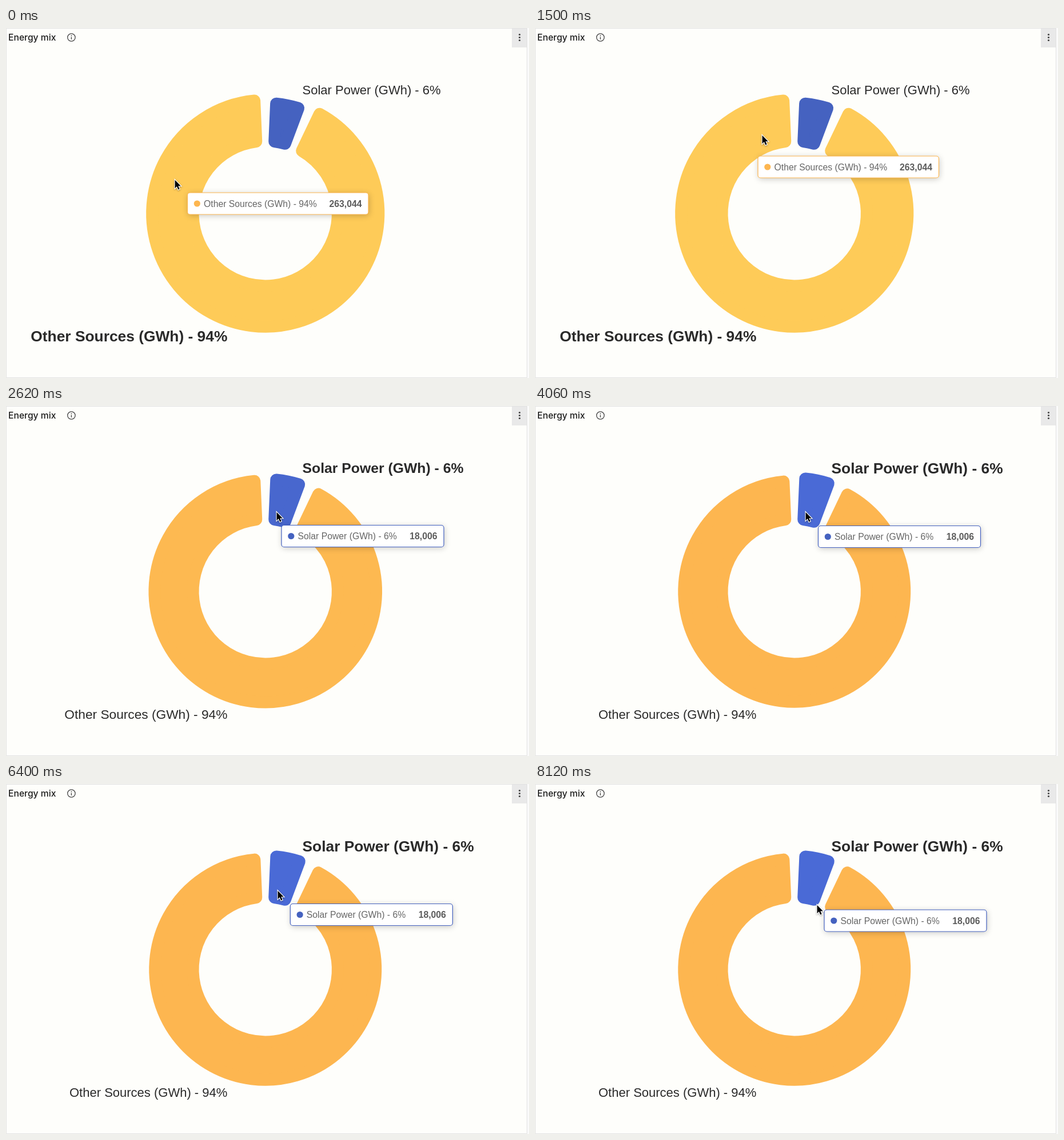
Animation of 915 by 612 pixels, one loop 8140 ms. Source, as an HTML page with a canvas:

```html
<!DOCTYPE html>
<html lang="en">
<head>
<meta charset="utf-8">
<title>Energy mix</title>
<style>
  html, body { margin: 0; width: 100%; height: 100%; overflow: hidden; background: #fefefb; }
  canvas { display: block; }
</style>
</head>
<body>
<canvas id="stage" width="915" height="612"></canvas>
<script>
const ctx = document.getElementById('stage').getContext('2d');
const LOOP = 8140, CX = 453.75, CY = 324.2, INNER = 116.2;
const SANS = '"Liberation Sans", Arial, sans-serif';

// Keys are [step, x, y]
const pointerKeys = [
  [0, 295, 265], [6, 307, 252], [15, 336, 225], [18, 350, 212], [24, 372, 197],
  [31, 397, 187], [46, 445, 184], [50, 460, 184.5], [55, 473, 185], [126, 473, 185],
  [134, 475, 186], [148, 475, 186], [162, 483, 196], [174, 493, 211]
];
const tipKeys = [
  [0, 317.5, 288], [8, 322, 281], [15, 336.5, 265], [18, 347, 256], [31, 390, 224],
  [36, 411, 216], [46, 451, 209], [55, 482, 208.5], [62, 492, 209.5], [72, 495.5, 209.5],
  [126, 495.5, 209.5], [138, 497.5, 209.5], [150, 497.5, 209.5], [164, 501, 213], [174, 506, 220]
];
const parts = [
  { name: 'Other Sources (GWh) - 94%', value: '263,044', from: 25.56, to: 357.5,
    plain: [253, 182, 80], lit: [254, 203, 88], x: 387.3, y: 537.7, align: 'right', tipWidth: 316.5 },
  { name: 'Solar Power (GWh) - 6%', value: '18,006', from: 2.5, to: 20.56,
    plain: [69, 98, 192], lit: [74, 106, 214], x: 518.5, y: 107.4, align: 'left', tipWidth: 284 }
];

const clamp = v => Math.max(0, Math.min(1, v));
const cubicOut = p => 1 - (1 - p) ** 3;
const mix = (a, b, p) => a + (b - a) * p;
const rgb = c => `rgb(${c.map(Math.round)})`;

// Smooth interpolation that never overshoots its keys
function along(keys, n, axis) {
  const slope = i => keys[i + 1] && keys[i]
    ? (keys[i + 1][axis] - keys[i][axis]) / (keys[i + 1][0] - keys[i][0]) : 0;
  const tangent = i => {
    const a = slope(i - 1), b = slope(i);
    return a * b > 0 ? 2 * a * b / (a + b) : 0;
  };
  let i = 0;
  while (i < keys.length - 2 && n > keys[i + 1][0]) i++;
  const h = keys[i + 1][0] - keys[i][0], u = clamp((n - keys[i][0]) / h);
  const ease = u * u * (3 - 2 * u);
  return mix(keys[i][axis], keys[i + 1][axis], ease)
    + h * u * (1 - u) * ((1 - u) * tangent(i) - u * tangent(i + 1));
}

function text(str, x, y, font, color, align = 'left') {
  ctx.font = font;
  ctx.fillStyle = color;
  ctx.textAlign = align;
  ctx.fillText(str, x, y);
}

function dot(x, y, r, color) {
  ctx.fillStyle = color;
  ctx.beginPath();
  ctx.arc(x, y, r, 0, 7);
  ctx.fill();
}

function shadow(color, blur, x, y) {
  ctx.shadowColor = color;
  ctx.shadowBlur = blur;
  ctx.shadowOffsetX = x;
  ctx.shadowOffsetY = y;
}

// An inset sector with a thick round-joined outline gives the rounded corners
function sector(from, to, outer, color) {
  const round = 10.5, a = (from - 90) * Math.PI / 180, b = (to - 90) * Math.PI / 180;
  const big = outer - round, small = INNER + round;
  const padBig = Math.asin(round / big), padSmall = Math.asin(round / small);
  ctx.beginPath();
  ctx.arc(CX, CY, big, a + padBig, b - padBig);
  ctx.arc(CX, CY, small, b - padSmall, a + padSmall, true);
  ctx.closePath();
  ctx.fillStyle = ctx.strokeStyle = color;
  ctx.lineWidth = 2 * round;
  ctx.lineJoin = 'round';
  ctx.fill();
  ctx.stroke();
}

function panel() {
  ctx.fillStyle = '#fefefb';
  ctx.fillRect(0, 0, 915, 612);
  ctx.fillStyle = '#fafafa';
  ctx.fillRect(912, 0, 3, 612);
  ctx.fillStyle = '#e9e9e9';
  ctx.fillRect(885, 0, 27, 34);
  ctx.strokeStyle = '#e2e2e2';
  ctx.lineWidth = 1;
  ctx.strokeRect(0.5, 0.5, 911, 611);
  text('Energy mix', 4, 22, '500 15.7px Inter, sans-serif', '#1c1c1c');
  ctx.strokeStyle = '#444';
  ctx.lineWidth = 1.3;
  ctx.beginPath();
  ctx.arc(114.4, 16.5, 6.7, 0, 7);
  ctx.moveTo(114.4, 15.6);
  ctx.lineTo(114.4, 20);
  ctx.stroke();
  dot(114.4, 13.3, 0.9, '#444');
  for (const y of [11.5, 16.5, 21.5]) dot(898.5, y, 1.6, '#444');
}

function tooltip(part, x, y) {
  const color = rgb(part.plain);
  ctx.save();
  shadow('rgba(0,0,0,.22)', 11, 1, 2);
  ctx.fillStyle = '#fff';
  ctx.beginPath();
  ctx.roundRect(x, y, part.tipWidth, 38, 4.5);
  ctx.fill();
  ctx.restore();
  ctx.strokeStyle = color;
  ctx.lineWidth = 1.2;
  ctx.stroke();
  dot(x + 16.8, y + 19, 5.6, color);
  text(part.name, x + 28.5, y + 24.5, `15.75px ${SANS}`, '#666');
  text(part.value, x + part.tipWidth - 11.5, y + 24.5, `bold 15.75px ${SANS}`, '#5c5c5c', 'right');
}

function pointer(x, y) {
  ctx.save();
  ctx.translate(x, y);
  ctx.beginPath();
  ctx.moveTo(0.6, 0.8);
  for (const [px, py] of [[0.6, 15.2], [3.9, 12.1], [6.3, 17.6], [8.6, 16.6], [6.3, 11.2], [10.8, 11.2]])
    ctx.lineTo(px, py);
  ctx.closePath();
  ctx.lineJoin = 'miter';
  ctx.lineWidth = 2.2;
  ctx.strokeStyle = '#fff';
  shadow('rgba(0,0,0,.35)', 3, 0, 1);
  ctx.stroke();
  shadow('transparent', 0, 0, 0);
  ctx.fillStyle = '#000';
  ctx.fill();
  ctx.restore();
}

function draw(n) {
  panel();
  const fade = start => cubicOut(clamp((n - start) / 19));
  const glow = [1 - fade(46.3), fade(49.6)];
  const bold = [n < 46.3, n >= 49.6];
  parts.forEach((part, i) => {
    const color = part.plain.map((c, k) => mix(c, part.lit[k], glow[i]));
    sector(part.from, part.to, mix(203.5, 208.6, glow[i]), rgb(color));
  });
  parts.forEach((part, i) => {
    const size = mix(22, 26.35, glow[i]);
    text(part.name, part.x, part.y + 0.4 * size,
      `${bold[i] ? 'bold ' : ''}${size}px ${SANS}`, '#2a2a2a', part.align);
  });
  tooltip(parts[bold[1] ? 1 : 0], along(tipKeys, n, 1), along(tipKeys, n, 2));
  pointer(along(pointerKeys, n, 1), along(pointerKeys, n, 2));
}

// The picture advances in groups of three steps, lasting 100, 20 and 20 ms
function stepAt(ms) {
  const rest = ms % 140;
  return 3 * Math.floor(ms / 140) + (rest >= 100) + (rest >= 120);
}

const begin = performance.now();
function tick() {
  draw(stepAt((performance.now() - begin) % LOOP));
  requestAnimationFrame(tick);
}
tick();
</script>
</body>
</html>
```
